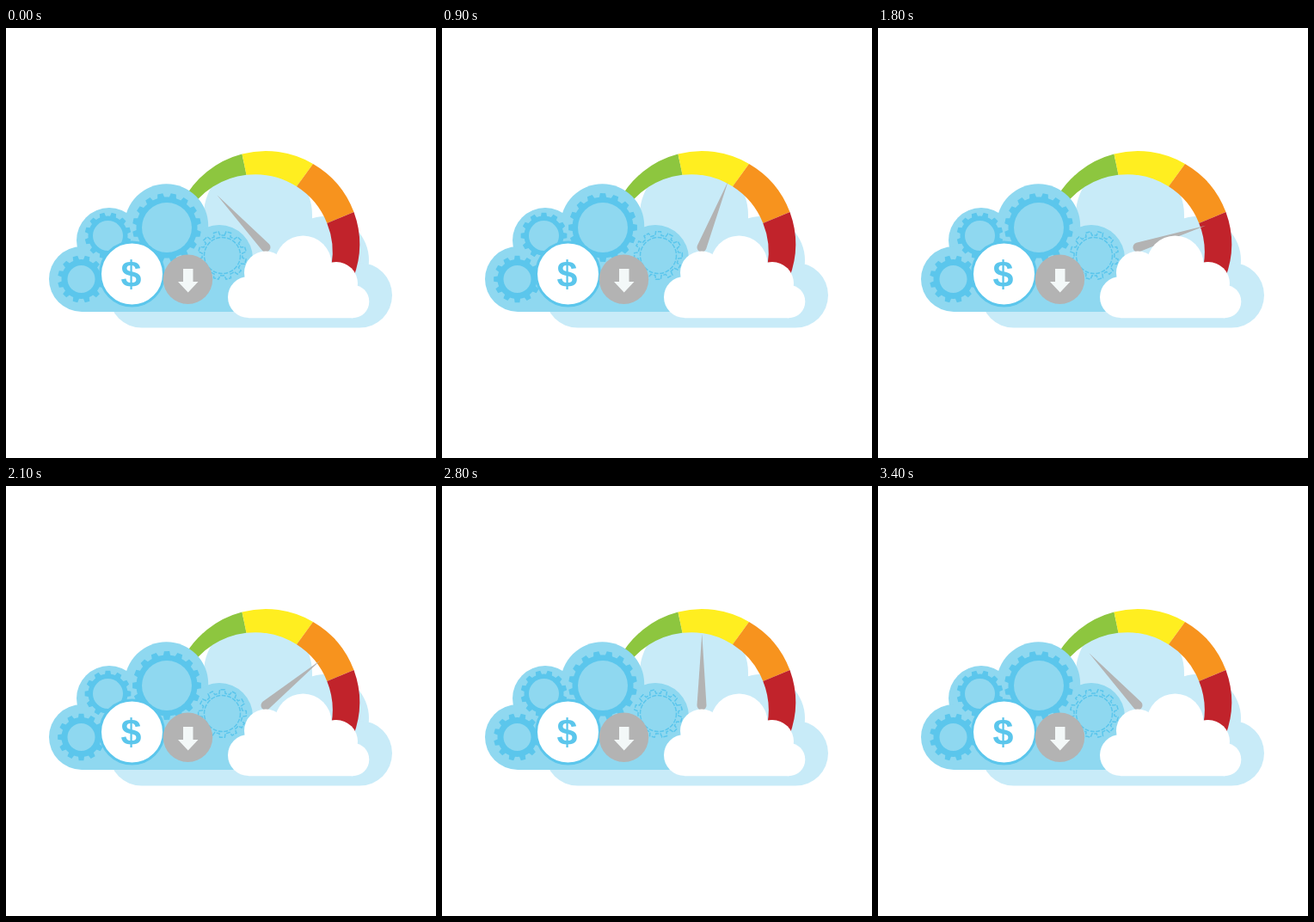
An HTML page for the animation above (3.5 s loop, 500x500 px).

```html
<!DOCTYPE html>
<html lang="en">
<head>
<meta charset="utf-8">
<title>Cloud cost gauge</title>
<style>
html, body { margin: 0; width: 100%; height: 100%; overflow: hidden; background: #fff; }
svg { display: block; width: 100vw; height: 100vh; }
</style>
</head>
<body>
<svg viewBox="0 0 500 500">
  <g fill="#c8ebf8">
    <circle cx="293" cy="217" r="63"/>
    <circle cx="371" cy="270" r="51"/>
    <rect x="120" y="273" width="329" height="75.5" rx="37.7"/>
    <path d="M230 217H356V240L400 300H230Z"/>
  </g>
  <g id="dial"></g>
  <g fill="#8fd8f0">
    <circle cx="120" cy="247" r="38"/>
    <circle cx="186.5" cy="230" r="48.7"/>
    <circle cx="248" cy="268" r="39"/>
    <rect x="50" y="254" width="240" height="76" rx="38"/>
    <path d="M100 250H270V330H100Z"/>
  </g>
  <g id="gears"></g>
  <circle cx="146.5" cy="286" r="37" fill="#fff" stroke="#5bc6ec" stroke-width="3"/>
  <text x="145.5" y="301" text-anchor="middle" font-family="Liberation Sans, Arial, sans-serif" font-weight="700" font-size="43" fill="#5bc6ec">$</text>
  <circle cx="211.5" cy="292.3" r="28.7" fill="#b3b3b3"/>
  <path d="M206 280H217.500V295H223.500L211.700 307.500L200 295H206Z" fill="#f3f8f8"/>
  <path id="needle" d="M0-83L5.500 0A5.500 5.500 0 0 1-5.500 0Z" fill="#b3b3b3"/>
  <g fill="#fff">
    <circle cx="302" cy="284.5" r="25"/>
    <circle cx="345.500" cy="274.500" r="33"/>
    <circle cx="384" cy="297" r="25"/>
    <circle cx="282" cy="313" r="24"/>
    <circle cx="403" cy="318" r="19.3"/>
    <path d="M282 289H385L403 300V337.200H282Z"/>
  </g>
</svg>
<script>
const $ = id => document.getElementById(id);

function add(parent, tag, attrs) {
  const el = document.createElementNS('http://www.w3.org/2000/svg', tag);
  for (const key in attrs) el.setAttribute(key, attrs[key]);
  return parent.appendChild(el);
}

// Dividing lines of the dial: outer point, then inner point
const cuts = [
  ['205 202.300', '212 214.200'],
  ['274.500 146.500', '279.500 170.800'],
  ['357 157.900', '338 184.300'],
  ['404.500 214', '373.300 227'],
  ['404 290', '378.500 276']
];
['#8dc63f', '#ffee20', '#f7931e', '#c1232b'].forEach((fill, i) => {
  const [a, b] = [cuts[i], cuts[i + 1]];
  add($('dial'), 'path', {
    fill,
    d: `M${a[0]}A109 109 0 0 1 ${b[0]}L${b[1]}A90.3 90.3 0 0 0 ${a[1]}Z`
  });
});

function gearPath(teeth, body, tip) {
  const points = [];
  for (let i = 0; i < teeth; i++) {
    for (const [offset, r] of [[-.29, body], [-.2, tip], [.2, tip], [.29, body], [.5, body]]) {
      const a = (i + offset) / teeth * 2 * Math.PI;
      points.push(`${(r * Math.sin(a)).toFixed(2)} ${(-r * Math.cos(a)).toFixed(2)}`);
    }
  }
  return `M${points.join('L')}Z`;
}

const gears = [
  { x: 187, y: 232, teeth: 16, body: 35.5, tip: 40, hole: 29 },
  { x: 118.5, y: 241.5, teeth: 12, body: 23, tip: 27, hole: 17.5 },
  { x: 87.5, y: 292, teeth: 12, body: 23, tip: 27.5, hole: 16 },
  { x: 251.5, y: 264.5, teeth: 12, body: 23.5, tip: 28, hole: 21, outline: true }
];
for (const g of gears) {
  const paint = g.outline
    ? { fill: 'none', stroke: '#5bc6ec', 'stroke-width': 1.5, 'stroke-dasharray': '5 1.5' }
    : { fill: '#5bc6ec' };
  g.el = add($('gears'), 'path', { d: gearPath(g.teeth, g.body, g.tip), ...paint });
  const center = { cx: g.x, cy: g.y, r: g.hole };
  add($('gears'), 'circle', g.outline ? { ...center, ...paint } : { ...center, fill: '#8fd8f0' });
}

function draw(now) {
  const step = Math.floor(now % 3500 / 100);
  const angle = -43 + 7.2 * (17 - Math.abs(17 - step));
  $('needle').setAttribute('transform', `translate(302 255) rotate(${angle})`);
  for (const g of gears) {
    // Half a tooth per step
    const turn = (step + 1) * 180 / g.teeth;
    g.el.setAttribute('transform', `translate(${g.x} ${g.y}) rotate(${turn})`);
  }
  requestAnimationFrame(draw);
}
draw(0);
</script>
</body>
</html>
```
